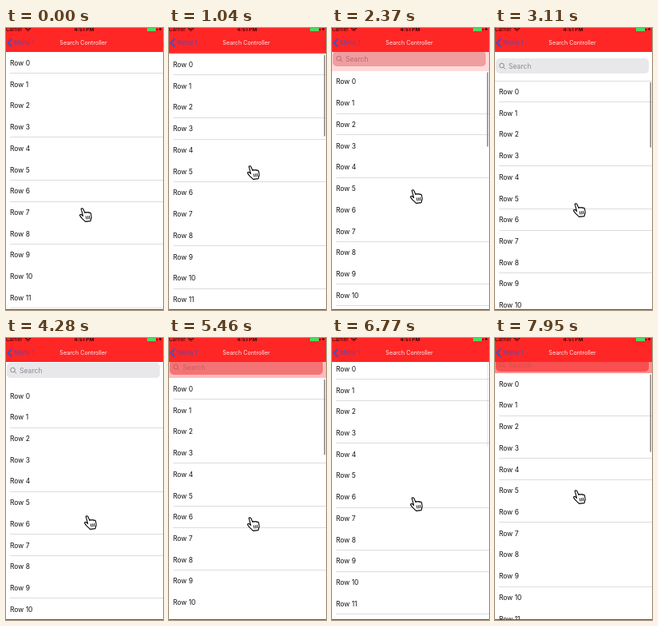
Animation, 197 px wide and 353 px high, one loop 8 s. Source, as an HTML page with a canvas:

```html
<!DOCTYPE html>
<html lang="en">
<head>
<meta charset="utf-8">
<title>Search Controller</title>
<style>
html, body { margin: 0; width: 100%; height: 100%; overflow: hidden; background: #fff; }
canvas { display: block; }
</style>
</head>
<body>
<canvas id="stage" width="197" height="353"></canvas>
<script>
const ctx = document.getElementById('stage').getContext('2d');
const W = 197, H = 353, NAV = 30, PITCH = 26.73;
const LOOP = 8000, STEP = 147;
const RED = [255, 38, 38], WHITE = [255, 255, 255], LINE = '#dcdcdf';

const hand = new Path2D('M2.2 1.2Q3.6 0 4.8 1.6L7 6.4Q8.2 5 9.6 6.2Q11 5 12.2 6.4Q14 5.6 14.6 7.6L15.2 12L14 16.6L7.6 17.4L2.6 12.6L.6 9.6Q.8 8 2.6 8.6L4.6 10.4Z');
const knuckles = new Path2D('M8.4 10.5l.6 4M10.5 10.3l.5 4M12.5 10l.5 4');

const mix = (a, b, p) => `rgb(${a.map((v, i) => Math.round(v + (b[i] - v) * p))})`;
const frac = v => v - Math.floor(v);
const ramp = (n, a, b) => Math.min(1, Math.max(0, (n - a) / (b - a)));

// centre of Row 0, cursor place and scroll bar opacity at step n
function pose(n) {
  const pull = 38.52 * ramp(n, 6, 22) ** 1.05;
  const settle = 9.89 * (1 - (1 - ramp(n, 24, 29)) ** 2);
  const push = 33.75 * ramp(n, 31, 46) ** 1.49;
  const again = 18.87 * ramp(n, 50, 54);
  const approach = ramp(n, 0, 4);
  return {
    y: 43.19 + pull - settle - push + again,
    cx: 92 + 6 * approach,
    cy: 225 - 56 * approach + 53 * ramp(n, 6, 22) + 11 * ramp(n, 30, 32)
      - push - 28 * ramp(n, 47, 50) + again,
    bar: ramp(n, 6, 7) - ramp(n, 25, 29) + ramp(n, 31, 32) - ramp(n, 43, 46.5) + ramp(n, 50, 51)
  };
}

function rect(color, x, y, w, h) {
  ctx.fillStyle = color;
  ctx.fillRect(x, y, w, h);
}

function pill(color, x, y, w, h, r) {
  ctx.fillStyle = color;
  ctx.beginPath();
  ctx.roundRect(x, y, w, h, r);
  ctx.fill();
}

function text(s, x, y, size, color, weight = 400, align = 'left') {
  ctx.font = `${weight} ${size}px Inter, "Liberation Sans", sans-serif`;
  ctx.textAlign = align;
  ctx.fillStyle = color;
  ctx.fillText(s, x, y);
}

function stroke(path, color, width) {
  ctx.strokeStyle = color;
  ctx.lineWidth = width;
  ctx.stroke(path);
}

function drawRows(y) {
  for (let k = 0; k < 13; k++) {
    const mid = y + k * PITCH;
    text('Row ' + k, 5, Math.round(mid + 0.7) + 3, 8.5, '#111');
    // hairlines only survive the downscaling at some heights
    if (frac(y + k * 3 / 8) < 0.5) rect(LINE, 5, Math.floor(mid + 13.6), W - 5, 1);
  }
}

function drawSearch(y) {
  const top = Math.round(y - 13);
  if (top <= NAV) return;
  const open = Math.min(1, (top - NAV) / 29), tint = open ** 3;
  rect(mix(RED, WHITE, open), 0, NAV, W, top - NAV);
  if (y > 74) rect(LINE, 0, top, W, 1);
  const bottom = Math.round(top - 9 * open * open);
  pill(mix([250, 60, 60], [232, 232, 234], tint), 1, bottom - 19, 192, 19, 5);
  const mid = Math.round(bottom - 9.5 + (1 - open) * 3);
  const ink = mix([228, 70, 70], [138, 138, 143], tint);
  text('Search', 17, mid + 3, 8.6, ink);
  const lens = new Path2D();
  lens.arc(8.5, mid - 1, 2.8, 0, 7);
  lens.moveTo(10.5, mid + 1);
  lens.lineTo(13, mid + 3.5);
  stroke(lens, ink, 1);
}

function drawBar(y, alpha) {
  const top = y - 13;
  const length = 98.5 - 0.4 * (top - 41) - 0.9 * Math.max(0, top - 59);
  ctx.globalAlpha = alpha;
  pill('#858585', 194.5, Math.max(NAV, top) + 1.5, 1.5, length, 0.7);
  ctx.globalAlpha = 1;
}

function drawNav() {
  rect(`rgb(${RED})`, 0, 0, W, NAV);
  text('Carrier', 0, 4, 6.3, '#200');
  stroke(new Path2D('M24 1Q27.5-2 31 1M25.5 2.5Q27.5 .8 29.5 2.5M27 3.7h1'), '#200', 1.1);
  text('4:51 PM', 98, 4, 6.5, '#200', 600, 'center');
  rect('#4cd964', 177, 0, 11, 4);
  rect('#300', 189, 1, 1, 2);
  stroke(new Path2D('M192 1.5h3M193.5 0v3'), '#300', 1);
  stroke(new Path2D('M7.3 13.5L2.5 18.5L7.3 23.5'), '#1f5ae0', 1.8);
  text('Menu 1', 10, 21, 7.6, '#6446a8');
  text('Search Controller', 97, 21, 7.2, '#ffe9e9', 400, 'center');
}

function drawHand(x, y) {
  ctx.save();
  ctx.translate(Math.round(x), Math.round(y));
  ctx.lineJoin = 'round';
  ctx.fillStyle = '#fff';
  ctx.fill(hand);
  stroke(hand, '#000', 1.1);
  stroke(knuckles, '#000', 0.9);
  ctx.restore();
}

function draw(now) {
  const { y, cx, cy, bar } = pose(Math.floor(now % LOOP / STEP));
  rect('#fff', 0, 0, W, H);
  drawRows(y);
  drawSearch(y);
  drawBar(y, bar);
  drawNav();
  rect('#555', 0, H - 1, W, 1);
  drawHand(cx, cy);
}

let start;
function tick(now) {
  start ??= now;
  draw(now - start);
  requestAnimationFrame(tick);
}
draw(0);
requestAnimationFrame(tick);
</script>
</body>
</html>
```
